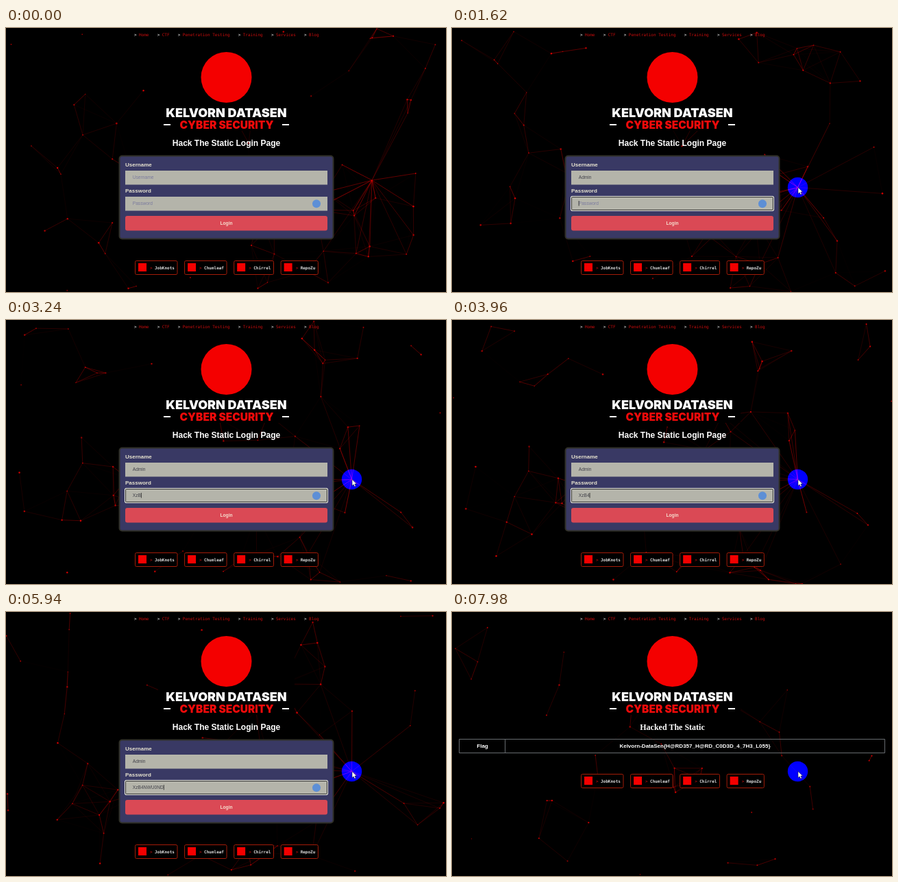
An HTML page with a canvas for the animation above (8000 ms loop, 642 px wide and 385 px high).

```html
<!DOCTYPE html>
<html lang="en">
<head>
<meta charset="utf-8">
<title>Login page</title>
<style>
  html, body { margin: 0; width: 100%; height: 100%; overflow: hidden; background: #000; }
  canvas, svg { position: absolute; left: 0; top: 0; width: 642px; height: 385px; }
  text { font-family: "Liberation Sans", Arial, sans-serif; white-space: pre; }
  .mono { font: 6px "DejaVu Sans Mono", monospace; }
  .brand { font-family: Inter, sans-serif; font-weight: 900; text-anchor: middle; }
  .bold { font-weight: 700; }
  .mid { text-anchor: middle; }
  .title { font-size: 12px; fill: #fff; }
  .serif { font-family: "Liberation Serif", serif; }
  .cell { font-size: 8px; fill: #fff; }
  .label { font-size: 8px; font-weight: 700; fill: #e6e2cf; }
  .entry { font-size: 6.67px; fill: #42424a; }
  .entry.hint { fill: #7b7b9e; }
  #halo { mix-blend-mode: screen; }
</style>
</head>
<body>
<canvas id="net" width="642" height="385"></canvas>
<svg viewBox="0 0 642 385">
  <rect x="222" y="28" width="199" height="122"/>
  <g id="nav"></g>
  <circle cx="321.5" cy="72" r="37" fill="#f40000"/>
  <text class="brand" x="321.5" y="130" font-size="18" fill="#fff">KELVORN DATASEN</text>
  <text class="brand" x="322" y="146.5" font-size="15.5" fill="#f00a0a">CYBER SECURITY</text>
  <path d="M230 141h10M403 141h10" stroke="#fff" stroke-width="2"/>

  <g id="login">
    <text class="title bold mid" x="321.5" y="172">Hack The Static Login Page</text>
    <rect x="165.5" y="186.5" width="312" height="121" rx="4" fill="#393964" stroke="#303028" stroke-width="2"/>
    <text class="label" x="174" y="202">Username</text>
    <text class="label" x="174" y="239.5">Password</text>
    <g id="fields"></g>
    <rect x="174" y="274" width="295" height="21.5" rx="3" fill="#da4955"/>
    <text class="bold mid" x="321.5" y="287" font-size="6.67" fill="#f6dfcf">Login</text>
  </g>

  <g id="result">
    <text class="title serif bold mid" x="321.5" y="172">Hacked The Static</text>
    <path d="M10.5 185.5h621v20h-621zM77.5 185.5v20" fill="none" stroke="#686c70"/>
    <text class="cell bold mid" x="44.5" y="198">Flag</text>
    <text class="cell bold mid" x="354.5" y="198">Kelvorn-DataSen{H@RD357_H@RD_C0D3D_4_7H3_L055}</text>
  </g>

  <g id="social"></g>
</svg>
<svg id="halo" viewBox="0 0 642 385"><circle r="14.7" fill="#00f"/></svg>
<svg viewBox="0 0 642 385">
  <path id="arrow" d="M0 0v9.2l2.1-1.9 1.5 3.3 1.7-.8-1.5-3.2h2.8z" fill="#fff" stroke="#111" stroke-width=".5"/>
</svg>

<script>
const W = 642, H = 385, LOOP = 8000, STEP = 60;
const RESULT_AT = 7680, BLINK = 350;
const LINK = 75, GRAB = 145;
const $ = id => document.getElementById(id);
const show = (el, on) => { el.style.display = on ? "" : "none"; };

// Each item starts where the previous one ends: monospace advance plus a gap
let navX = 187;
for (const name of ["Home", "CTF", "Penetration Testing", "Training", "Services", "Blog"]) {
  $("nav").innerHTML += `<text class="mono" x="${navX}" y="12" fill="#fff">&gt;</text>
    <text class="mono" x="${navX + 7}" y="12" fill="#c80d0d">${name}</text>`;
  navX += name.length * 3.61 + 19.3;
}

let boxX = 188;
for (const name of ["JobKnots", "Chumleaf", "Chirrel", "RepoZu"]) {
  const width = name.length * 3.61 + 32.6;
  $("social").innerHTML += `<rect x="${boxX + .5}" y="339.5" width="${width}" height="20" rx="2" stroke="#a31c08"/>
    <rect x="${boxX + 5}" y="343" width="12" height="12" fill="#f40000"/>
    <text class="mono" x="${boxX + 22}" y="352" fill="#d01010">&gt;</text>
    <text class="mono bold" x="${boxX + 29}" y="352" fill="#dcdcdc" style="font-weight:700">${name}</text>`;
  boxX += width + 10.6;
}

// keyTime(k) is when character k is typed; the password speeds up
const fields = [
  { hint: "Username", value: "Admin", y: 208, from: 300, to: 1440, keepIcon: false,
    keyTime: k => 540 + 165 * k },
  { hint: "Password", value: "XzB4NWU0NDcz==", y: 246, from: 1440, to: LOOP, keepIcon: true,
    keyTime: k => 2430 + 418 * k - 6.5 * k * k }
];
for (const field of fields) {
  const g = document.createElementNS("http://www.w3.org/2000/svg", "g");
  g.setAttribute("transform", `translate(174 ${field.y})`);
  g.innerHTML = `<rect width="295" height="20.5" fill="#b4b4aa"/>
    <g fill="none"><rect x="-.5" y="-.5" width="296" height="21" rx="1.5" stroke="#f4f4ea"/>
    <rect x=".5" y=".5" width="294" height="19" rx="1" stroke="#2a2a2a"/></g>
    <text class="entry" x="10.7" y="12.2"></text>
    <rect y="6" width=".8" height="7.5" fill="#222"/>
    <circle cx="279" cy="10.3" r="6" fill="#5d8fd6"/>`;
  $("fields").append(g);
  [, field.ring, field.text, field.caret, field.icon] = g.children;
}

function drawField(f, t) {
  let count = 0;
  while (count < f.value.length && f.keyTime(count) <= t) count++;
  const focused = t >= f.from && t < f.to;
  const lastChange = count ? f.keyTime(count - 1) : f.from;
  f.text.textContent = count ? f.value.slice(0, count) : f.hint;
  f.text.classList.toggle("hint", !count);
  show(f.ring, focused);
  show(f.icon, f.keepIcon || focused);
  show(f.caret, focused && (t - lastChange) % (2 * BLINK) < BLINK);
  f.caret.setAttribute("x", 10.7 + (count ? f.text.getComputedTextLength() : 0));
}

// Particle network
function random(seed) {
  return () => {
    seed = seed + 0x6D2B79F5 | 0;
    let n = Math.imul(seed ^ seed >>> 15, 1 | seed);
    n = n + Math.imul(n ^ n >>> 7, 61 | n) ^ n;
    return ((n ^ n >>> 14) >>> 0) / 4294967296;
  };
}

function swarm(count, seed) {
  const rnd = random(seed);
  return Array.from({ length: count }, () => ({
    x: rnd() * W, y: rnd() * H,
    vx: (rnd() - .5) * .07, vy: (rnd() - .5) * .07,
    alpha: .45 + rnd() * .4, r: .7 + rnd() * .6
  }));
}
const loginSwarm = swarm(62, 7);
const resultSwarm = swarm(42, 21);

const ctx = $("net").getContext("2d");
const wrap = (v, size) => ((v % size) + size) % size;

function line(a, b, alpha) {
  ctx.strokeStyle = `rgba(255,0,0,${alpha})`;
  ctx.beginPath();
  ctx.moveTo(a.x, a.y);
  ctx.lineTo(b.x, b.y);
  ctx.stroke();
}

function drawNet(particles, t, mouse) {
  const now = particles.map(p => ({ ...p, x: wrap(p.x + p.vx * t, W), y: wrap(p.y + p.vy * t, H) }));
  ctx.clearRect(0, 0, W, H);
  ctx.lineWidth = .7;
  now.forEach((a, i) => {
    for (const b of now.slice(i + 1)) {
      const d = Math.hypot(a.x - b.x, a.y - b.y);
      if (d < LINK) line(a, b, .65 * (1 - d / LINK));
    }
    if (mouse) {
      const d = Math.hypot(a.x - mouse.x, a.y - mouse.y);
      if (d < GRAB) line(a, mouse, .8 * (1 - d / GRAB) + .12);
    }
    ctx.fillStyle = `rgba(255,0,0,${a.alpha})`;
    ctx.beginPath();
    ctx.arc(a.x, a.y, a.r, 0, 2 * Math.PI);
    ctx.fill();
  });
}

function pointer(t) {
  const k = Math.min(1, t / 480), ease = k * k * (3 - 2 * k);
  return { x: 534 - 29.5 * ease, y: 222 + 10.5 * ease };
}

function render(time) {
  const t = Math.floor((time % LOOP) / STEP) * STEP;
  const done = t >= RESULT_AT;
  const mouse = pointer(t);
  show($("login"), !done);
  show($("result"), done);
  $("social").setAttribute("transform", `translate(0 ${done ? -103 : 0})`);
  if (!done) fields.forEach(f => drawField(f, t));
  drawNet(done ? resultSwarm : loginSwarm, t, done ? null : mouse);
  for (const id of ["halo", "arrow"]) show($(id), t > 0);
  $("halo").firstElementChild.setAttribute("transform", `translate(${mouse.x} ${mouse.y})`);
  $("arrow").setAttribute("transform", `translate(${mouse.x + .5} ${mouse.y})`);
}

const start = performance.now();
function tick() {
  render(performance.now() - start);
  requestAnimationFrame(tick);
}
tick();
</script>
</body>
</html>
```
